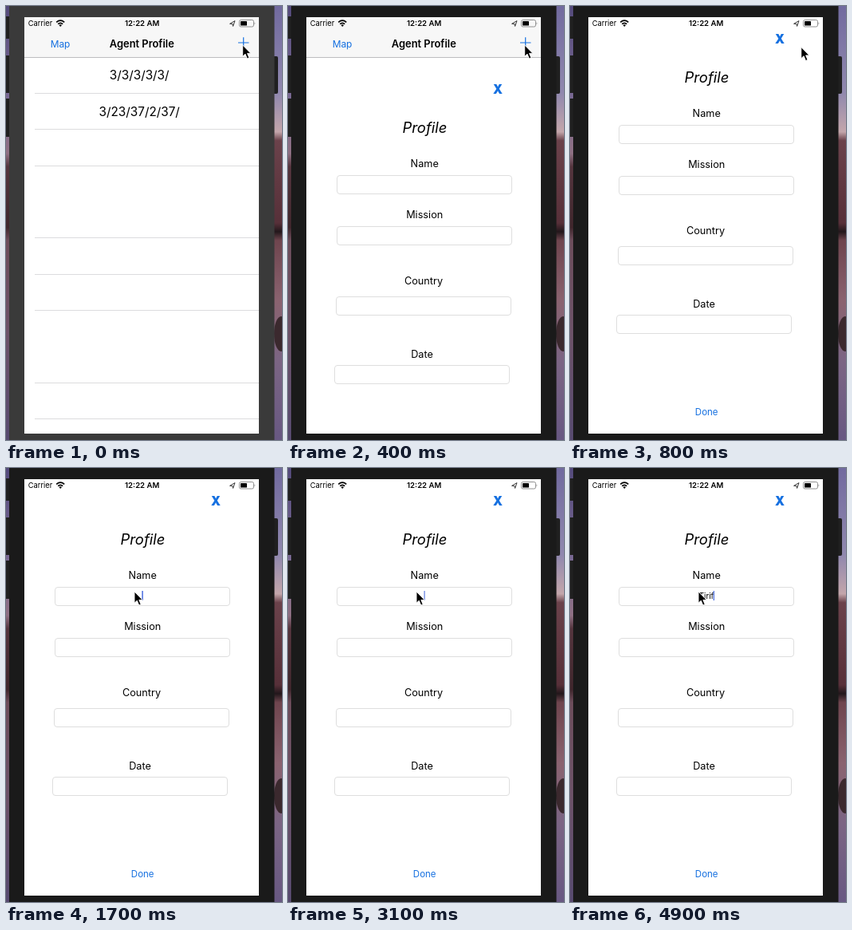
An HTML page that plays this animation: 346 by 544 pixels, repeating every 5000 ms.

```html
<!DOCTYPE html>
<html lang="en">
<head>
<meta charset="utf-8">
<title>Agent profile form</title>
<style>
  html, body { margin: 0; width: 100%; height: 100%; overflow: hidden; background: #1a1a1a; }
  svg { display: block; width: 346px; height: 544px; }
  text { font-family: Inter, Roboto, sans-serif; fill: #000; text-anchor: middle; }
  .blue { fill: #1570e0; }
  .label { font-size: 12.7px; }
  .field { fill: #fff; stroke: #dedede; }
  .line { stroke: #dcdcde; }
</style>
</head>
<body>
<svg viewBox="0 0 346 544">
  <defs>
    <linearGradient id="leftView" x1="0" y1="0" x2="0" y2="1">
      <stop offset="0" stop-color="#544a7c"/>
      <stop offset=".22" stop-color="#7b6a94"/>
      <stop offset=".34" stop-color="#8f7083"/>
      <stop offset=".37" stop-color="#55353e"/>
      <stop offset=".51" stop-color="#3f262c"/>
      <stop offset=".54" stop-color="#6d4d5b"/>
      <stop offset=".75" stop-color="#6d5268"/>
      <stop offset="1" stop-color="#574a70"/>
    </linearGradient>
    <linearGradient id="rightView" x1="0" y1="0" x2="0" y2="1">
      <stop offset="0" stop-color="#716a9f"/>
      <stop offset=".2" stop-color="#9088ae"/>
      <stop offset=".29" stop-color="#c3a6ab"/>
      <stop offset=".31" stop-color="#6b424b"/>
      <stop offset=".5" stop-color="#573039"/>
      <stop offset=".52" stop-color="#22171b"/>
      <stop offset=".54" stop-color="#6f454e"/>
      <stop offset=".68" stop-color="#8a6370"/>
      <stop offset=".82" stop-color="#7b6584"/>
      <stop offset="1" stop-color="#685882"/>
    </linearGradient>
    <clipPath id="screen"><rect x="23" y="14" width="294" height="522"/></clipPath>
  </defs>

  <rect width="6" height="544" fill="url(#leftView)"/>
  <rect x="334" width="12" height="544" fill="url(#rightView)"/>
  <ellipse cx="345" cy="411" rx="9" ry="22" fill="#3b292e"/>
  <g fill="#202020">
    <rect y="13" width="5" height="28"/>
    <rect y="62" width="5" height="47"/>
    <rect y="116" width="5" height="48"/>
    <rect x="334" y="63" width="7" height="47" rx="2"/>
  </g>
  <rect id="bezel" x="4" width="332.5" height="544"/>

  <g clip-path="url(#screen)">
    <rect x="23" y="14" width="294" height="522" fill="#fff"/>
    <g id="rows" font-size="15.3">
      <text x="167.2" y="92.2">3/3/3/3/3/</text>
      <text x="167.2" y="137.6">3/23/37/2/37/</text>
    </g>
    <rect x="23" y="14" width="294" height="51" fill="#f7f7f7"/>
    <path d="M23 64.5H317" stroke="#bdbdc0"/>
    <text class="blue" x="68" y="51.5" font-size="11.9">Map</text>
    <text x="170.3" y="51.6" font-size="12.9" font-weight="600">Agent Profile</text>
    <path d="M291 46H304.5M297.7 39.2V52.8" stroke="#1570e0" stroke-width="1.2"/>

    <g id="sheet">
      <rect x="23" y="14" width="294" height="522" fill="#fff"/>
      <text class="blue" x="263" y="46.6" font-size="15.3" font-weight="900">X</text>
      <text x="171.4" y="95.7" font-size="18.4" font-style="italic">Profile</text>
      <g id="form"></g>
      <text class="blue" x="171.2" y="513" font-size="11.5">Done</text>
      <text id="entry" x="171" y="164" font-size="9.8"></text>
      <rect id="caret" y="154" width="1.4" height="12" fill="#3d62dc"/>
    </g>

    <text x="43" y="25.3" font-size="9.3">Carrier</text>
    <path d="M63.2 20.4Q68.2 16 73.2 20.4M65.2 22.6Q68.2 20 71.2 22.6"
          fill="none" stroke="#000" stroke-width="1.7"/>
    <path d="M66.4 24Q68.2 22.6 70 24L68.2 26Z"/>
    <text x="170.7" y="25.3" font-size="9.6" font-weight="600">12:22 AM</text>
    <path d="M280.6 22.3L287 18.6L284.6 25.4L284 22.4Z" fill="none" stroke="#222" stroke-width=".9"/>
    <rect x="292.5" y="17.5" width="18" height="8.5" rx="2" fill="none" stroke="#777" stroke-width=".8"/>
    <rect x="294" y="19" width="8" height="5.6" rx=".7"/>
    <path d="M311.6 20.2Q313.2 21.8 311.6 23.4Z" fill="#777"/>
  </g>

  <path id="pointer" d="M0 0V14.2L3.3 11.2L5.7 17L8.2 16L5.8 10.4H10.2Z"
        stroke="#fff" stroke-width=".9" stroke-linejoin="round"/>
</svg>
<script>
const LOOP = 5000, STEP = 100;
const NAME = "Tirif";
const $ = id => document.getElementById(id);

// label, label centre, label baseline, field left, field top
const fields = [
  ["Name", 171.2, 139, 61.5, 149.5],
  ["Mission", 171.2, 203.3, 61.5, 213.5],
  ["Country", 170, 285.5, 60.5, 301.5],
  ["Date", 168, 377.8, 58.5, 387.5]
];
$("form").innerHTML = fields.map(([label, cx, base, x, y]) =>
  `<text class="label" x="${cx}" y="${base}">${label}</text>
   <rect class="field" x="${x}" y="${y}" width="219" height="23" rx="3.5"/>`).join("");

$("rows").innerHTML += [109.5, 154.5, 200.5, 290.5, 336.5, 381.5, 472.5, 517.5]
  .map(y => `<path class="line" d="M36 ${y}H317"/>`).join("");

// each track: [time, ...values], linear between entries
const pointerTrack = [[600, 296.7, 49], [800, 289.8, 51.5], [1000, 250, 88], [1200, 198, 135], [1500, 161, 155]];
const caretTrack = [
  [1500, 0], [1600, 1], [2000, 1], [2300, 0], [2400, 0], [2700, 1],
  [3000, 1], [3100, .7], [3300, 0], [3400, 0], [3600, 1], [4800, 1], [4900, .85]
];
const typing = [[3900, 1], [4100, 2], [4200, 4], [4400, 5]];

function sample(track, t) {
  const next = track.findIndex(k => k[0] > t);
  if (next === 0) return track[0].slice(1);
  if (next < 0) return track.at(-1).slice(1);
  const a = track[next - 1], b = track[next];
  const p = (t - a[0]) / (b[0] - a[0]);
  return a.slice(1).map((v, i) => v + (b[i + 1] - v) * p);
}

// critically damped spring, from 1 to 0
function settle(t) {
  const u = Math.max(0, t - 180) / 1000 * 16.6;
  return t >= 800 ? 0 : (1 + u) * Math.exp(-u);
}

function draw(t) {
  $("bezel").setAttribute("fill", t < 100 ? "#3a3a3a" : "#1a1a1a");
  $("sheet").setAttribute("transform", `translate(0 ${Math.round(522 * settle(t))})`);
  $("pointer").setAttribute("transform", `translate(${sample(pointerTrack, t)})`);

  const count = typing.filter(k => k[0] <= t).length;
  const text = NAME.slice(0, count ? typing[count - 1][1] : 0);
  const entry = $("entry"), caret = $("caret");
  entry.textContent = text;
  const half = text ? entry.getComputedTextLength() / 2 : 0;
  caret.setAttribute("x", 170.4 + half);
  caret.setAttribute("opacity", sample(caretTrack, t)[0]);
}

const start = performance.now();
function tick() {
  const t = (performance.now() - start) % LOOP;
  draw(Math.floor(t / STEP) * STEP);
  requestAnimationFrame(tick);
}
tick();
</script>
</body>
</html>
```
